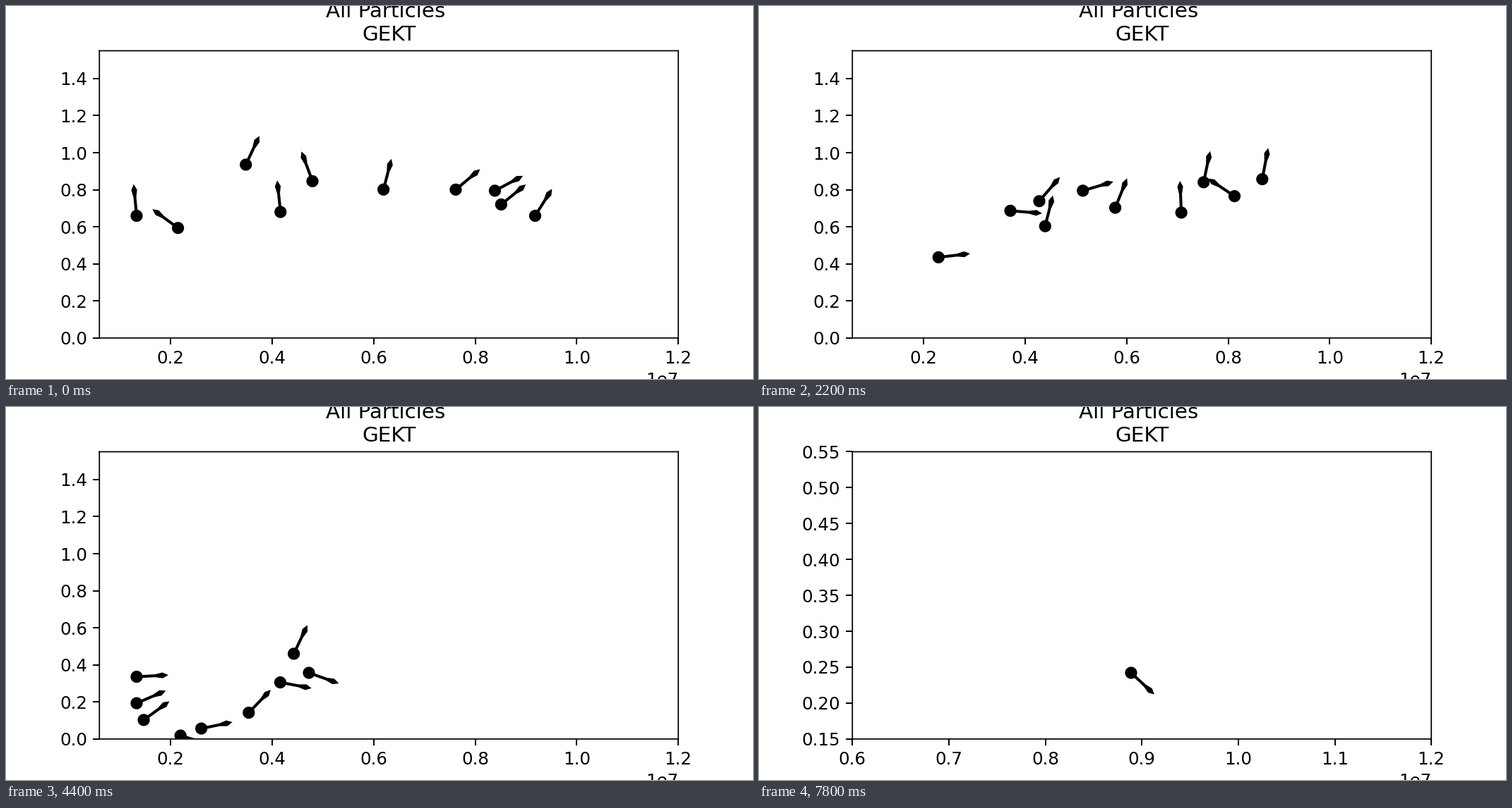
These frames come from a looping animation (1058x529 px, 8000 ms). A matplotlib script:

```python
import numpy as np
import matplotlib.pyplot as plt
from matplotlib.animation import FuncAnimation
from matplotlib.collections import PolyCollection
from matplotlib.transforms import Affine2D

W, H = 1058, 529
FRAMES, INTERVAL = 40, 200
RADIUS = 8.6
REACH = 45        # arrow length in pixels
SHAFT = 0.005 * 0.775 * W

# Swarm at key frames: close view, count, line it is scattered along
# (x0, y0, x1, y1 in stage pixels), headings at both ends in degrees.
SWARMS = {
    0: (False, 10, 180, 320, 795, 260, 100, 50),
    4: (False, 9, 222, 425, 566, 320, 0, 100),
    11: (False, 10, 253, 300, 740, 245, 38, 145),
    12: (False, 9, 220, 395, 770, 385, 20, 60),
    19: (False, 9, 176, 405, 419, 405, 40, 0),
    23: (True, 3, 230, 305, 554, 410, 158, 102),
    32: (False, 9, 189, 330, 627, 300, 200, 300),
    35: (True, 1, 527, 377, 527, 377, 137, 137),
}


def swarm_at(n):
    """Blend the swarm towards the next one unless the view changes there."""
    last = max(k for k in SWARMS if k <= n)
    following = min((k for k in SWARMS if k > n), default=last)
    now, then = SWARMS[last], SWARMS[following]
    if now[0] != then[0] or following == last:
        return now
    u = (n - last) / (following - last)
    return now[:2] + tuple(a + (b - a) * u for a, b in zip(now[2:], then[2:]))


def particles(n):
    """Every frame redraws the scatter; bigger swarms are looser."""
    close, count, x0, y0, x1, y1, h0, h1 = swarm_at(n)
    rng = np.random.default_rng(n)
    loose = 4 * (count - 1) * rng.normal(size=(3, count))
    x = np.linspace(x0, x1, count) + loose[0]
    y = np.linspace(y0, y1, count) + loose[1]
    heading = np.linspace(h0, h1, count) + loose[2]
    if close:
        heading += 180 * (n % 2)
    return zip(np.clip(x, 185, 785), np.clip(y, 225, 466), heading)


turn = np.linspace(0, 2 * np.pi, 48, endpoint=False)
DISC = RADIUS * np.column_stack([np.cos(turn), np.sin(turn)])
neck, barb = REACH - 4.5 * SHAFT, REACH - 2 * SHAFT
EDGE = np.array([(0, SHAFT / 2), (neck, SHAFT / 2), (barb, SHAFT), (REACH, 0)])
ARROW = np.vstack([EDGE, EDGE[-2::-1] * (1, -1)])


def shapes(x, y, heading):
    c, s = np.cos(np.radians(heading)), np.sin(np.radians(heading))
    arrow = ARROW @ np.array([(c, -s), (s, c)])
    return [DISC + (x, y), arrow + (x, y)]


# The tiny extra keeps the pixel size from rounding down.
fig, ax = plt.subplots(figsize=(6.00005, 3.00005), dpi=W / 6)
ax.set_title("All Particles \nGEKT")
for spine in ax.spines.values():
    spine.set_snap(False)
    spine.set_linewidth(0.72)

stage = Affine2D().scale(1 / W, -1 / H).translate(0, 1) + fig.transFigure
swarm = PolyCollection([], facecolors="black", linewidths=0, transform=stage)
ax.add_collection(swarm, autolim=False)


def set_view(close):
    if close:
        ax.set_xticks(np.arange(6, 13) * 1e6)
        ax.set_yticks(np.arange(3, 12) * 0.05)
        ax.set_xlim(6e6, 1.2e7)
        ax.set_ylim(0.15, 0.55)
    else:
        ax.set_xticks(np.arange(2, 13, 2) * 1e6)
        ax.set_yticks(np.arange(8) * 0.2)
        ax.set_xlim(6e5, 1.2e7)
        ax.set_ylim(0, 1.55)


def draw(n):
    set_view(swarm_at(n)[0])
    swarm.set_verts([shape for p in particles(n) for shape in shapes(*p)])
    return [swarm]


anim = FuncAnimation(fig, draw, frames=FRAMES, interval=INTERVAL,
                     init_func=lambda: draw(0), repeat=True, repeat_delay=0)
plt.show()
```
